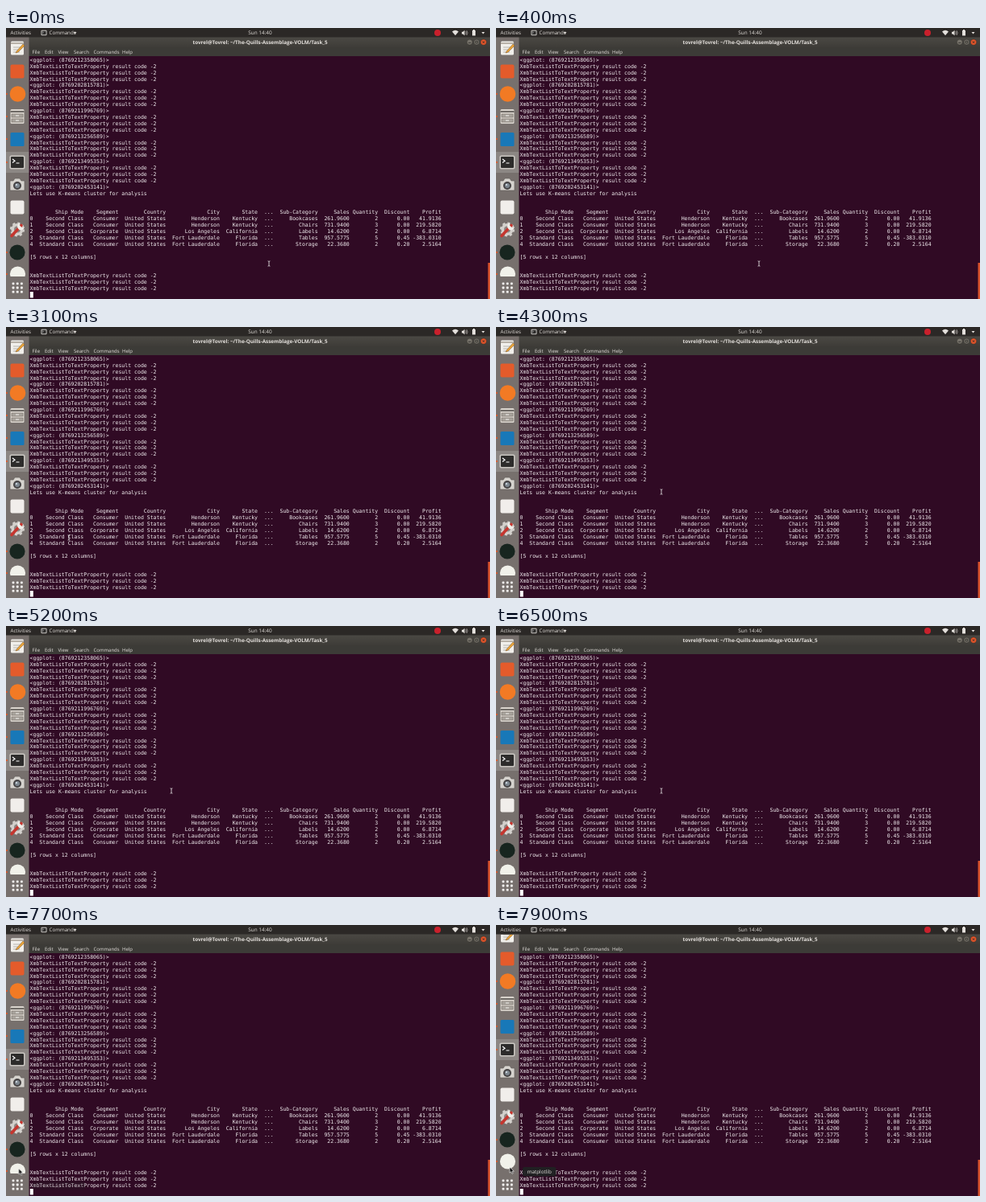
These frames come from a looping animation (600x337 px, 8000 ms). An HTML page:

```html
<!DOCTYPE html>
<html lang="en">
<head>
<meta charset="utf-8">
<title>Shell session</title>
<style>
html, body { margin: 0; width: 100%; height: 100%; overflow: hidden; background: #300a24; }
svg { display: block; width: 100vw; height: 100vh; }
text { font: 6px "Open Sans", "Noto Sans", sans-serif; fill: #e4e0dc; white-space: pre; text-rendering: geometricPrecision; }
#output text { font: 6.527px "DejaVu Sans Mono", monospace; fill: #f2eef0; }
.bold { font-weight: 700; }
#caret, #pointer, #beam, #arrow, #icons, .tip { animation: 8s linear infinite; }
#caret { animation-name: blink; animation-timing-function: step-end; }
#pointer { animation-name: travel; animation-timing-function: ease-in-out; }
#beam { animation-name: beam; animation-timing-function: step-end; }
#arrow { animation-name: arrow; animation-timing-function: step-end; }
#icons { animation-name: scroll; animation-timing-function: step-end; }
#appsTip { animation-name: appsTip; }
#plotTip { animation-name: plotTip; animation-timing-function: step-end; }
@keyframes blink {
  0%, 8.75%, 23.75%, 38.75%, 53.75%, 100% { opacity: 1; }
  1.25%, 16.25%, 31.25%, 46.25% { opacity: 0; }
}
@keyframes travel {
  0%, 13.75% { transform: translate(326px, 293px); }
  21.25%, 43.75% { transform: translate(78px, 262px); }
  51.25%, 86.25% { transform: translate(205px, 205px); }
  91.25%, 94% { transform: translate(6px, 316px); }
  97%, 100% { transform: translate(17px, 301px); }
}
@keyframes beam { 0% { opacity: 1; } 90.25%, 100% { opacity: 0; } }
@keyframes arrow { 0% { opacity: 0; } 90.25%, 100% { opacity: 1; } }
@keyframes scroll {
  0% { transform: none; }
  97.5% { transform: translateY(-6px); }
  98.75%, 100% { transform: translateY(-12px); }
}
@keyframes appsTip {
  0%, 91.5% { opacity: 0; }
  92.5% { opacity: .5; }
  93.75%, 95.5% { opacity: 1; }
  96.5%, 100% { opacity: 0; }
}
@keyframes plotTip { 0% { opacity: 0; } 97.5% { opacity: .5; } 98.75%, 100% { opacity: 1; } }
</style>
</head>
<body>
<svg viewBox="0 0 600 337" preserveAspectRatio="none">
  <defs>
    <clipPath id="dockArea"><rect y="12" width="29" height="297"/></clipPath>
    <linearGradient id="titleFill" x2="0" y2="1">
      <stop stop-color="#4b4944"/><stop offset="1" stop-color="#3d3b37"/>
    </linearGradient>
  </defs>
  <rect width="600" height="337" fill="#300a24"/>

  <g id="output"></g>
  <rect id="caret" x="29.8" y="328" width="4" height="7.5" fill="#fff"/>
  <rect x="597.5" y="292" width="2.5" height="45" fill="#d9522c"/>

  <!-- window frame -->
  <rect x="28" y="11" width="572" height="14" fill="url(#titleFill)"/>
  <rect x="28" y="24.5" width="572" height="10.5" fill="#3c3b37"/>
  <text class="bold" x="315" y="19.8" text-anchor="middle" style="font-size:6.3px">tovrel@Tovrel: ~/The-Quills-Assemblage-VOLM/Task_5</text>
  <g id="menu"></g>
  <g fill="#77736b" stroke="#2c2a27" stroke-width=".5">
    <circle cx="574.8" cy="17.6" r="3.5"/><circle cx="583.4" cy="17.6" r="3.5"/>
    <circle cx="592" cy="17.6" r="3.7" fill="#e9562a"/>
  </g>
  <g fill="none" stroke="#2d2b28" stroke-width=".8">
    <path d="M573.2 18.4h3.2M582 16.3h2.8v2.6h-2.8zM590.6 16.2l2.8 2.8m0-2.8l-2.8 2.8"/>
  </g>

  <!-- dock -->
  <rect y="11" width="28.5" height="326" fill="#77706d"/>
  <g clip-path="url(#dockArea)">
    <g id="icons">
      <g transform="translate(14 25)">
        <rect x="-8" y="-8.5" width="16" height="17" rx="1.5" fill="#f1efeb"/>
        <path d="M-8-6h16" stroke="#b9b2a9" stroke-width="2"/>
        <path d="M-5-1H4M-5 2H2M-5 5H3" stroke="#a6a39f" stroke-width=".8"/>
        <path d="M-1 4L7-5l2 2-8 8-3 1z" fill="#e9a33a" stroke="#7b5528" stroke-width=".5"/>
      </g>
      <rect x="5.5" y="45.5" width="17" height="17" rx="2" fill="#e45b2b"/>
      <circle cx="14.5" cy="82" r="9.8" fill="#f27a24"/>
      <g transform="translate(14 110)">
        <rect x="-8.5" y="-9" width="17" height="18" rx="1.5" fill="#d8d3cc"/>
        <path d="M-8.5-6h17" stroke="#6e6a66" stroke-width="2"/>
        <path d="M-7-3H7V1H-7zM-7 3H7V7H-7z" fill="#a9a49d" stroke="#77716b" stroke-width=".6"/>
        <path d="M-2-1h4M-2 5h4" stroke="#f4f2ef" stroke-width="1.2"/>
      </g>
      <rect x="5.5" y="130" width="17" height="17" rx="1.5" fill="#1878b8"/>
      <g transform="translate(14 167)">
        <rect x="-14" y="-13" width="28.5" height="26" fill="#fff" opacity=".16"/>
        <rect x="-9.5" y="-8.5" width="19" height="17" rx="1.8" fill="#c9c6c1"/>
        <rect x="-8" y="-7" width="16" height="14" rx="1" fill="#2d2c2b"/>
        <path d="M-6-4l3 2.2L-6 .4M-1.5 1h4" fill="none" stroke="#fff" stroke-width="1.2"/>
      </g>
      <g transform="translate(14 195)">
        <path d="M-9-5h4l2-3h6l2 3h4V7H-9z" fill="#d6d3ce" stroke="#625e5a" stroke-width=".7"/>
        <circle cy="1" r="5" fill="#454344"/><circle cy="1" r="3" fill="#7d8790"/><circle cx="-1" r="1" fill="#dde6ec"/>
      </g>
      <rect x="5.5" y="214.5" width="17" height="17" rx="2" fill="#f1eeeb"/>
      <g transform="translate(14 250.5)">
        <circle r="7.6" fill="#d3d0cc" stroke="#d3d0cc" stroke-width="3" stroke-dasharray="3 2.97"/>
        <circle r="4" fill="#8b8682"/>
        <path d="M-7 8L5-5" stroke="#c5362f" stroke-width="3.6" stroke-linecap="round"/>
        <path d="M3-8a4.5 4.5 0 1 0 6 5l-3 1-3-3z" fill="#f0eeea"/>
      </g>
      <circle cx="14" cy="279" r="9.6" fill="#17251f"/>
      <circle cx="14.5" cy="306" r="9.6" fill="#f1f1ea"/>
      <g id="marks" fill="#e95420"></g>
    </g>
  </g>
  <g id="grid" fill="#f4f2f0"></g>

  <!-- top bar -->
  <rect width="600" height="11.5" fill="#2b2826"/>
  <text x="5.5" y="8.2" style="font-size:6.2px">Activities</text>
  <rect x="43.5" y="2.8" width="7" height="6.4" rx="1" fill="#d6d3cf"/>
  <rect x="44.4" y="3.7" width="5.2" height="4.6" fill="#2d2c2b"/>
  <path d="M45.2 4.8l1.2.9-1.2.9" fill="none" stroke="#fff" stroke-width=".5"/>
  <text x="53.5" y="8.2" style="font-size:6.2px">Commands</text>
  <text x="315" y="8.2" text-anchor="middle" style="font-size:6.4px">Sun 14:40</text>
  <circle cx="535" cy="6" r="4" fill="#c9202c"/>
  <g fill="#e4e0dc">
    <path d="M83.5 5h4l-2 2.4zM589.5 5h4l-2 2.4z"/>
    <path d="M553 4.4q4-3.4 8 0L557 9.2z"/>
    <path d="M565 4.8h1.5l2-2v6.6l-2-2H565z"/>
    <path d="M578 3h1v-1h2v1h1v6.6h-4z"/>
  </g>
  <path d="M569.7 4.2q1.5 1.9 0 3.8M571 3.2q2.3 2.9 0 5.8" fill="none" stroke="#e4e0dc" stroke-width=".6"/>

  <g id="appsTip" class="tip">
    <rect x="33" y="318.5" width="65" height="11" rx="2.5" fill="#202223" opacity=".92"/>
    <text x="65.5" y="326.2" text-anchor="middle">Show Applications</text>
  </g>
  <g id="plotTip" class="tip">
    <rect x="33" y="301" width="41.5" height="11.5" rx="2.5" fill="#202223" opacity=".95"/>
    <text x="53.7" y="309" text-anchor="middle" style="font-size:6.3px">matplotlib</text>
  </g>
  <g id="pointer">
    <path id="beam" d="M-1.4-3.2Q0-3.2 0-2.3Q0-3.2 1.4-3.2M0-2.3V2.3M-1.4 3.2Q0 3.2 0 2.3Q0 3.2 1.4 3.2" fill="none" stroke="#eee" stroke-width=".8"/>
    <path id="arrow" d="M0 0V7.2l1.7-1.5 1.2 2.7 1.3-.6-1.2-2.6h2.3z" fill="#111" stroke="#fff" stroke-width=".6"/>
  </g>
</svg>
<script>
const byId = id => document.getElementById(id);

function add(parent, tag, attrs, content = "") {
  const node = document.createElementNS("http://www.w3.org/2000/svg", tag);
  for (const key in attrs) node.setAttribute(key, attrs[key]);
  node.textContent = content;
  parent.append(node);
}

const result = "XmbTextListToTextProperty result code -2";
const plots = ["8769212358065", "8769202815781", "8769211996769",
  "8769213256589", "8769213495353", "8769202453141"];
const columnEnds = [1, 17, 28, 43, 60, 72, 77, 91, 101, 110, 120, 130];
const table = [
  "|Ship Mode|Segment|Country|City|State|...|Sub-Category|Sales|Quantity|Discount|Profit",
  "0|Second Class|Consumer|United States|Henderson|Kentucky|...|Bookcases|261.9600|2|0.00|41.9136",
  "1|Second Class|Consumer|United States|Henderson|Kentucky|...|Chairs|731.9400|3|0.00|219.5820",
  "2|Second Class|Corporate|United States|Los Angeles|California|...|Labels|14.6200|2|0.00|6.8714",
  "3|Standard Class|Consumer|United States|Fort Lauderdale|Florida|...|Tables|957.5775|5|0.45|-383.0310",
  "4|Standard Class|Consumer|United States|Fort Lauderdale|Florida|...|Storage|22.3680|2|0.20|2.5164"
];
const formatRow = row => row.split("|").reduce(
  (line, cell, i) => line + cell.padStart(columnEnds[i] - line.length), "");

const lines = [
  ...plots.flatMap((id, i) => [...(i ? [result, result, result] : []), `<ggplot: (${id})>`]),
  "Lets use K-means cluster for analysis", "", "",
  ...table.map(formatRow),
  "", "[5 rows x 12 columns]", "", "",
  result, result, result
];
lines.forEach((line, i) => {
  if (line) add(byId("output"), "text", { x: 29.6, y: 41.8 + 7.9 * i }, line);
});

const menu = { File: 32.5, Edit: 48, View: 64.5, Search: 84, Commands: 108.5, Help: 144 };
for (const label in menu) add(byId("menu"), "text", { x: menu[label], y: 31.8 }, label);

for (const y of [82, 110, 138, 167, 279, 306])
  add(byId("marks"), "circle", { cx: 1, cy: y, r: 1 });

for (let i = 0; i < 9; i++)
  add(byId("grid"), "rect", { x: 7.6 + 5.2 * (i % 3), y: 316.4 + 5.2 * Math.floor(i / 3), width: 2.8, height: 2.8, rx: .6 });
</script>
</body>
</html>
```
